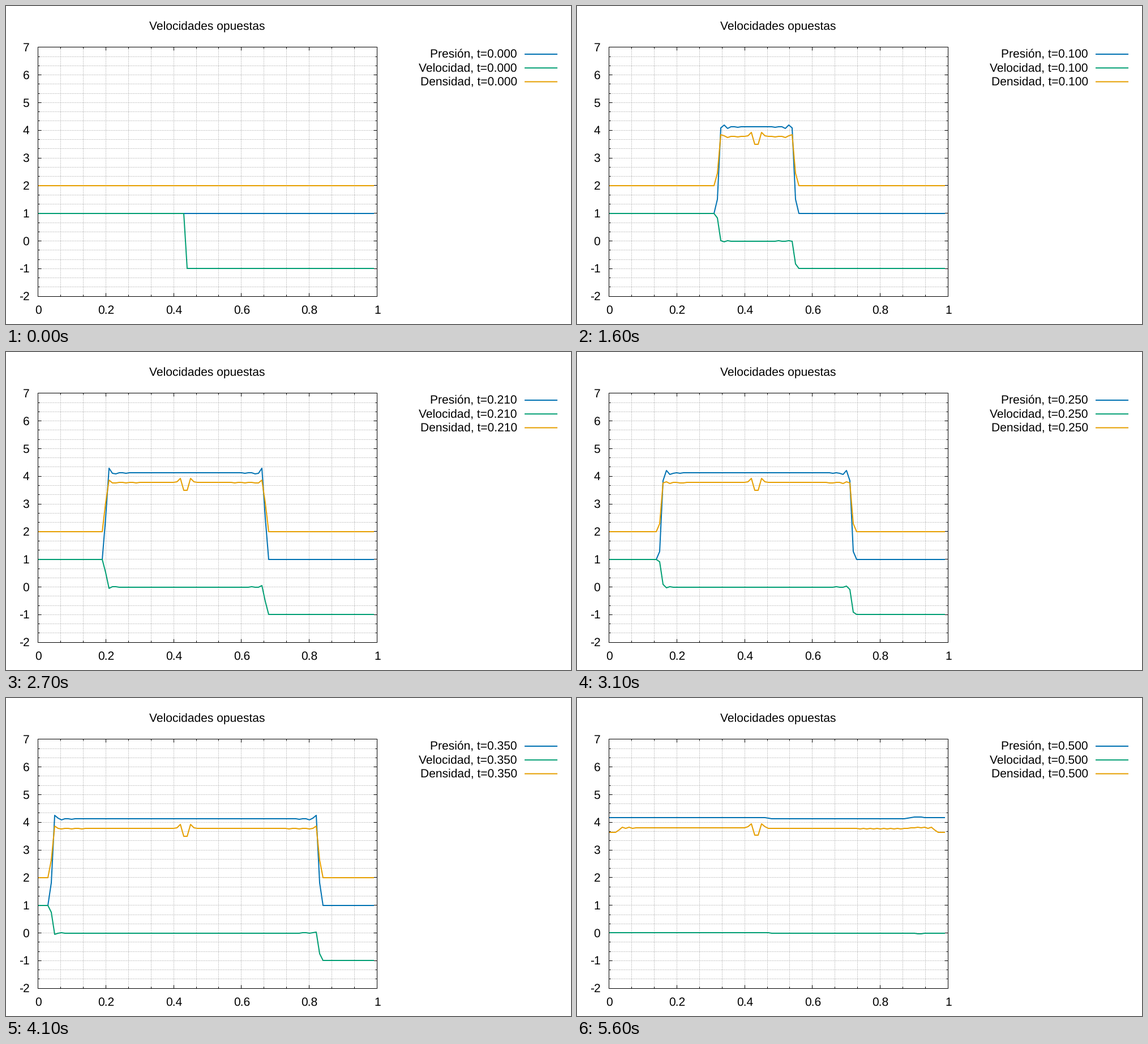
A matplotlib script that plays this animation: 998 by 561 pixels, repeating every 6300 ms.

```python
import numpy as np
import matplotlib.pyplot as plt
from matplotlib.animation import FuncAnimation

plt.rcParams["font.family"] = "Liberation Sans"
plt.rcParams["text.hinting"] = "none"

WIDTH, HEIGHT, DPI = 998, 561, 64
PT = 72 / DPI  # points per pixel
LEFT, RIGHT, TOP, BOTTOM = 56.5, 655.5, 72.8, 512.2
FONT_PX = 21
SERIES = (("Presión", "#0072b2"), ("Velocidad", "#009e73"), ("Densidad", "#e69f00"))

CELL = 0.01
CENTER = 0.435
SHOCK_SPEED = 1.125
X = np.arange(100) * CELL
SIDE = np.where(X < CENTER, 1, -1)
OFFSET = np.abs(X - CENTER)


def smooth(x, start, end):
    q = np.clip((x - start) / (end - start), 0, 1)
    return q * q * (3 - 2 * q)


def shock(cells):
    """Jump from 0 ahead of the front to 1 behind it, with damped ringing."""
    behind = np.maximum(cells - 0.35, 0)
    ringing = 0.105 * np.exp(-0.87 * behind) * np.sin(np.pi * behind / 1.6)
    return smooth(cells, -0.8, 0.85) + ringing


def contact(cells):
    """Density dip with raised shoulders where the two streams met."""
    return 0.49 * (cells**2 - 0.9) * np.exp(-cells**2 / 1.5)


def reflection(wall, gap):
    """Pressure rise and density change once a shock has left through a wall."""
    ahead = wall - (0.091 + 2.96 * gap)
    bump = 0.02 * max(1 - gap / 0.12, 0) * np.exp(-(ahead + 0.03)**2 / 0.0004)
    rise = 0.05 * (1 - smooth(ahead, -0.015, 0.02)) + bump
    cells = wall / CELL
    wiggle = 0.025 * np.exp((4 - cells) / 4) * np.cos(np.pi * cells) * (cells > 3.5)
    return rise, wiggle - 0.17 * (1 - smooth(cells, 2, 4))


def state(step):
    if step == 0:
        return np.ones(100), 1.0 * SIDE, np.full(100, 2.0)
    reach = SHOCK_SPEED * step * CELL - 0.00125
    behind = (reach - OFFSET) / CELL
    gaps = {1: reach - CENTER, -1: reach - (X[-1] - CENTER)}
    ramps = {side: np.clip((0.008 + gap) / 0.012, 0, 1) for side, gap in gaps.items()}

    # The ringing fades away once its shock has left the tube
    gone = np.where(SIDE == 1, ramps[1], ramps[-1])
    jump, dense = (f + gone * (1 - f) for f in (shock(behind), shock(behind + 0.12)))
    p = 1 + 3.12 * jump
    u = SIDE * (1 - jump)
    rho = 2 + 1.77 * dense + contact(OFFSET / CELL) * np.clip(behind / 2.5, 0, 1)

    for side, wall in ((1, X), (-1, X[-1] - X)):
        rise, change = reflection(wall, gaps[side])
        p += ramps[side] * rise
        u += ramps[side] * side * 0.3 * rise
        rho += ramps[side] * (0.6 * rise + change)
    return p, u, rho


def px(x):
    return LEFT + x * (RIGHT - LEFT)


def py(y):
    return BOTTOM - (y + 2) * (BOTTOM - TOP) / 9


def pixel(v):
    return np.floor(np.asarray(v) + 1e-6) + 0.5


fig = plt.figure(figsize=(WIDTH / DPI, HEIGHT / DPI), dpi=DPI, facecolor="white")
ax = fig.add_axes([0, 0, 1, 1])
ax.set_xlim(0, WIDTH)
ax.set_ylim(HEIGHT, 0)
ax.axis("off")


def line(xs, ys, color="black", width=1.0, snap=False, **kw):
    return ax.plot(xs, ys, color=color, lw=width * PT, snap=snap,
                   solid_capstyle="butt", **kw)[0]


def thin(xs, ys, **kw):
    line(pixel(xs), pixel(ys), **kw)


def label(x, y, text, ha="center"):
    return ax.text(x, y, text, ha=ha, va="baseline", fontsize=FONT_PX * PT)


def draw_grid():
    dots = dict(color="#909090", dashes=(1, 2), dash_capstyle="butt", zorder=1)
    for i in range(1, 15):
        thin([px(i / 15)] * 2, [BOTTOM, TOP], **dots)
    for i in range(1, 27):
        thin([LEFT, RIGHT], [py(i / 3 - 2)] * 2, **dots)


def draw_axes():
    for i in range(16):
        x, size = px(i / 15), 3 if i % 3 else 6
        thin([x, x], [BOTTOM, BOTTOM - size], zorder=2)
        thin([x, x], [TOP, TOP + size], zorder=2)
        if i % 3 == 0:
            label(x + 0.5, 543, f"{i / 15:g}")
    for i in range(28):
        y, size = py(i / 3 - 2), 3 if i % 3 else 6
        thin([LEFT, LEFT + size], [y, y], zorder=2)
        thin([RIGHT, RIGHT - size], [y, y], zorder=2)
        if i % 3 == 0:
            label(41.3, y + 7, str(i // 3 - 2), "right")
    thin([LEFT, RIGHT, RIGHT, LEFT, LEFT], [BOTTOM, BOTTOM, TOP, TOP, BOTTOM], zorder=4)


draw_grid()
draw_axes()
label(355, 42, "Velocidades opuestas")

curves, captions = [], []
for row, (name, color) in enumerate(SERIES):
    y = 85 + 24.3 * row
    line([916, 974], [y, y], color, 2)
    captions.append(label(903, y + 6, "", "right"))
    curves.append(line([], [], color, 2, snap=True, zorder=3, solid_joinstyle="round"))


def update(frame):
    step = min(max(frame - 6, 0), 50)
    for curve, caption, (name, _), values in zip(curves, captions, SERIES, state(step)):
        curve.set_data(px(X), py(values))
        caption.set_text(f"{name}, t={step * CELL:.3f}")
    return curves + captions


anim = FuncAnimation(fig, update, frames=63, interval=100, repeat=True,
                     repeat_delay=0, blit=False)
plt.show()
```
